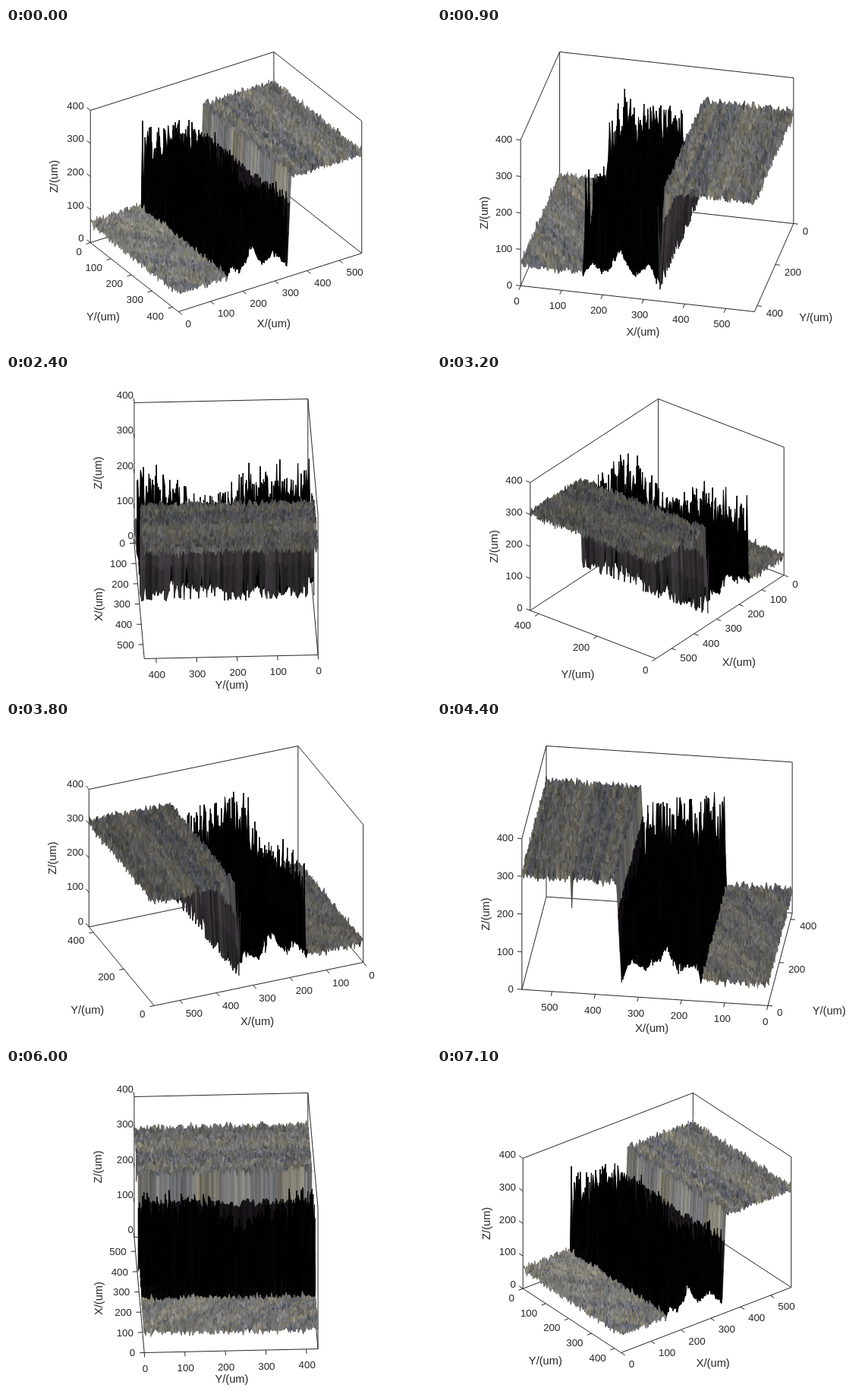
These frames come from a looping animation (560 by 420 pixels, 7.2 s). An HTML page with a canvas:

```html
<!DOCTYPE html>
<html>
<head>
<meta charset="utf-8">
<style>
  html, body { margin: 0; width: 100%; height: 100%; overflow: hidden; background: #fff; }
  canvas { display: block; }
</style>
</head>
<body>
<canvas id="stage" width="560" height="420"></canvas>
<script>
const ctx = document.getElementById('stage').getContext('2d');
const X = 570, Y = 429, Z = 400;
const COLS = 143, ROWS = 107, DX = X / COLS, DY = Y / ROWS;
const LOW_END = 152, WALL = 339, HIGH_START = 350;
const INK = '#262626', FONT = '"Liberation Sans", Arial, sans-serif';
const rad = Math.PI / 180;

const hash = (a, b) => {
  const h = Math.sin(a * 12.9898 + b * 78.233) * 43758.5453;
  return h - Math.floor(h);
};

function height(i, j) {
  const x = i * DX, y = j * DY, r = hash(i + 1, j + 7), q = hash(i + 31, j + 3);
  if (x < LOW_END) return 60 + (r + q - 1) * 20;
  if (x > HIGH_START) {
    if (j === 0 && i === 114) return 225;
    return 305 + (r + q - 1) * 22;
  }
  if (x > WALL) return 30 + 25 * hash(j, 5) + 250 * (x - WALL) / (HIGH_START - WALL);
  const v = 1 - y / Y;
  const arch = Math.sqrt(Math.max(0, Math.sin(Math.PI * (x - LOW_END) / (WALL - LOW_END))));
  const floor = 20 + 15 * q + 125 * arch * (0.6 + 0.25 * Math.sin(x / 12 + y / 60) + 0.15 * Math.sin(y / 17));
  const crest = (325 - 100 * Math.exp(-(((v - 0.38) / 0.15) ** 2))) * (1 - (x - LOW_END) / 1200);
  return floor + r ** 4 * (crest - floor);
}

function texture(i, j) {
  const x = (i + 0.5) * DX, y = (j + 0.5) * DY;
  const upper = x > HIGH_START - 2;
  const across = upper ? x : x - 0.8 * y + 600;
  const band = hash(Math.floor(across / 13), 2);
  const grain = hash(Math.floor(across / 4), Math.floor(y / 22));
  const light = (upper ? 112 : 120) + 30 * (band - 0.5) + 34 * (grain - 0.5) + 42 * (hash(i, j) - 0.5);
  const warm = 1.3 * (hash(Math.floor(across / 9), Math.floor(y / 34) + 50) + band) - 1.05;
  return [light + 7 * warm, light + 3 * warm, light - 11 * warm];
}

const heights = [], colours = [];
for (let i = 0; i <= COLS; i++) {
  heights.push(Array.from({ length: ROWS + 1 }, (_, j) => height(i, j)));
  colours.push(Array.from({ length: ROWS }, (_, j) => texture(i, j)));
}

let sin, cos, scale;

function setView(az) {
  sin = Math.sin(az);
  cos = Math.cos(az);
  scale = 342 / ((X * Math.abs(sin) + Y * Math.abs(cos)) * 0.5 + Z * Math.cos(30 * rad));
}

function project(x, y, z) {
  const dx = x - X / 2, dy = y - Y / 2;
  return [
    290 + scale * (dx * cos - dy * sin),
    202.5 + scale * ((dx * sin + dy * cos) * 0.5 - (z - Z / 2) * Math.cos(30 * rad))
  ];
}

const unit = ([x, y]) => { const n = Math.hypot(x, y); return [x / n, y / n]; };

function line(a, b) {
  ctx.beginPath();
  ctx.moveTo(...a);
  ctx.lineTo(...b);
  ctx.stroke();
}

function text(str, x, y, size, align, turned) {
  ctx.save();
  ctx.translate(x, y);
  if (turned) ctx.rotate(-Math.PI / 2);
  ctx.font = size + 'px ' + FONT;
  ctx.textAlign = align;
  ctx.textBaseline = 'middle';
  ctx.fillStyle = INK;
  ctx.fillText(str, 0, 0);
  ctx.restore();
}

function tick(p, dir) {
  line(p, [p[0] + 6 * dir[0], p[1] + 6 * dir[1]]);
}

// Draws ticks, numbers and title of a floor axis; at(v) gives the stage point of value v.
function floorAxis(name, at, length, step, dir, frontAtEnd, tilt, lean) {
  const a = at(0), b = at(length);
  const u = unit(frontAtEnd ? [b[0] - a[0], b[1] - a[1]] : [a[0] - b[0], a[1] - b[1]]);
  const level = Math.abs(u[1]) < 0.17 * Math.abs(u[0]);
  const align = level ? 'center' : dir[0] > 0 ? 'left' : 'right';
  const gap = level ? 13 : 12;
  const drop = Math.abs(dir[1]) < 0.05 ? 1 : 9;
  for (let v = 0; v <= length; v += step) {
    const p = at(v);
    tick(p, dir);
    text(v, p[0] + gap * dir[0], p[1] + gap * dir[1] + drop, 13.33, align);
  }
  let out = [-u[1], u[0]];
  if (out[0] * dir[0] + out[1] * dir[1] < 0) out = [u[1], -u[0]];
  const upright = tilt > 85;
  const away = upright ? 53 : 37 + 0.52 * tilt;
  const along = upright ? 0 : lean + Math.max(0, tilt - 60) * 2.2;
  text(name, (a[0] + b[0]) / 2 + away * out[0] + along * u[0],
    (a[1] + b[1]) / 2 + away * out[1] + along * u[1], 14.67, 'center', upright);
}

function drawAxes() {
  const fx = sin > 0 ? X : 0, fy = cos > 0 ? Y : 0;
  const bx = X - fx, by = Y - fy;
  ctx.strokeStyle = INK;
  ctx.lineWidth = 1;

  for (const [x, y] of [[fx, by], [bx, by], [bx, fy]]) {
    line(project(x, y, 0), project(x, y, Z));
  }
  line(project(bx, by, Z), project(fx, by, Z));
  line(project(bx, by, Z), project(bx, fy, Z));
  for (const y of [0, Y]) line(project(0, y, 0), project(X, y, 0));
  for (const x of [0, X]) line(project(x, 0, 0), project(x, Y, 0));

  const outX = x => unit(x ? [cos, sin / 2] : [-cos, -sin / 2]);
  const outY = y => unit(y ? [-sin, cos / 2] : [sin, -cos / 2]);
  const turn = Math.asin(Math.abs(sin)) / rad;
  floorAxis('X/(um)', v => project(v, fy, 0), X, 100, outY(fy), fx > 0, turn, 12);
  floorAxis('Y/(um)', v => project(fx, v, 0), Y, turn < 55 && turn > 0 && fx && cos > 0 || turn < 60 && cos < 0 || turn < 25 ? 200 : 100,
    outX(fx), fy > 0, 90 - turn, 0);

  const zx = cos > 0 ? 0 : X, zy = sin > 0 ? Y : 0;
  const dir = outX(zx)[1] < 0 ? outX(zx) : outY(zy);
  for (let v = 0; v <= Z; v += 100) {
    const p = project(zx, zy, v);
    tick(p, dir);
    text(v, p[0] + 11 * dir[0], p[1] + 10 * dir[1] + 1, 13.33, 'right');
  }
  const mid = project(zx, zy, Z / 2);
  text('Z/(um)', mid[0] - 47, mid[1], 14.67, 'center', true);
}

function cellColour(i, j, glow) {
  const x = (i + 0.5) * DX;
  let c, k = 1;
  if (x < LOW_END - 2 || x > HIGH_START - 2) {
    c = colours[i][j];
    k = glow;
  } else if (x > WALL - 5) {
    const t = (x - WALL + 5) / 16;
    k = 0.65 + 0.7 * hash(Math.floor(j / 2), 9);
    c = sin > 0 ? [34 + 26 * t, 32 + 24 * t, 34 + 26 * t] : [24 * t, 19 * t, 25 * t];
  } else {
    const d = 7 * hash(i, Math.floor(j / 3));
    c = [d * 0.7, d, d * 0.8];
  }
  return `rgb(${c.map(v => Math.round(v * k)).join()})`;
}

function drawSurface(az) {
  const points = heights.map((col, i) => col.map((z, j) => project(i * DX, j * DY, z)));
  const glow = 0.87 + 0.13 * Math.cos(az + 50 * rad);
  ctx.lineWidth = 0.6;
  ctx.lineJoin = 'bevel';
  // Cells are painted from the far corner towards the viewer.
  for (let a = 0; a < COLS; a++) {
    const i = sin > 0 ? a : COLS - 1 - a;
    for (let b = 0; b < ROWS; b++) {
      const j = cos > 0 ? b : ROWS - 1 - b;
      ctx.fillStyle = ctx.strokeStyle = cellColour(i, j, glow);
      ctx.beginPath();
      ctx.moveTo(...points[i][j]);
      ctx.lineTo(...points[i + 1][j]);
      ctx.lineTo(...points[i + 1][j + 1]);
      ctx.lineTo(...points[i][j + 1]);
      ctx.closePath();
      ctx.fill();
      ctx.stroke();
    }
  }
}

let shown = -1;
function frame() {
  const step = Math.floor(performance.now() / 100) % 72;
  if (step !== shown) {
    shown = step;
    const az = (5 * step - 32.5) * rad;
    setView(az);
    ctx.fillStyle = '#fff';
    ctx.fillRect(0, 0, 560, 420);
    drawAxes();
    drawSurface(az);
  }
  requestAnimationFrame(frame);
}
frame();
</script>
</body>
</html>
```
